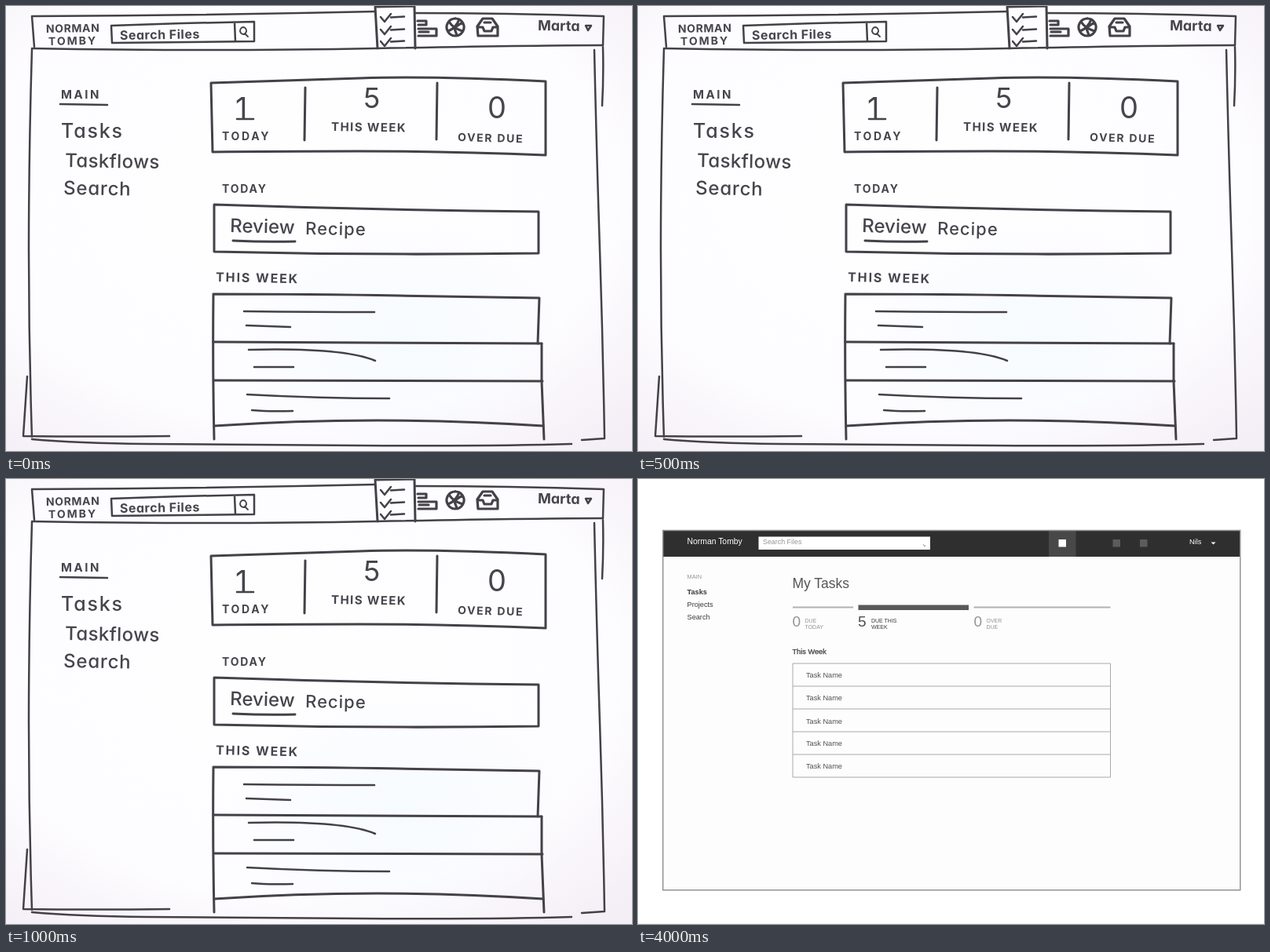
An HTML page for the animation above (5.1 s loop, 797 by 567 pixels).

```html
<!DOCTYPE html>
<html lang="en">
<head>
<meta charset="utf-8">
<title>Sketch to screen</title>
<style>
html, body { margin: 0; width: 100%; height: 100%; overflow: hidden; background: #fff; }
svg { display: block; width: 797px; height: 567px; }
.pen { fill: none; stroke: #444148; stroke-width: 2.5; stroke-linecap: round; stroke-linejoin: round; }
.box { stroke-width: 3; }
.hand { font: 700 14px Inter, sans-serif; font-feature-settings: "cv11"; fill: #47454c; }
.big { font-weight: 500; font-size: 24px; }
.num { font-weight: 400; }
.ui { font: 9.2px "Liberation Sans", Arial, sans-serif; fill: #3c3c3c; }
.ui .soft { fill: #959595; }
.ui .small { font-size: 7px; }
.ui .num { font-size: 19px; }

/* one push transition, shown as two hard steps */
.sketch { animation: sketch 5100ms step-end infinite; }
.dim { animation: dim 5100ms step-end infinite; }
.ui { animation: push 5100ms step-end infinite; }
@keyframes sketch { 0% { transform: none; } 58.8235% { transform: translateX(-225px); } 100% { transform: none; } }
@keyframes dim { 0% { opacity: 0; } 58.8235% { opacity: .23; } 100% { opacity: 0; } }
@keyframes push {
  0% { transform: translateX(800px); }
  58.8235% { transform: translateX(52px); }
  60.7843% { transform: none; }
  100% { transform: translateX(800px); }
}
</style>
</head>
<body>
<svg viewBox="0 0 797 567">
  <defs>
    <radialGradient id="paper" cx=".46" cy=".42" r=".76">
      <stop offset="0" stop-color="#fefeff"/>
      <stop offset=".68" stop-color="#fdfcfe"/>
      <stop offset="1" stop-color="#f4eef6"/>
    </radialGradient>
    <radialGradient id="cool">
      <stop offset="0" stop-color="#f6fbff"/>
      <stop offset="1" stop-color="#f6fbff" stop-opacity="0"/>
    </radialGradient>
    <path id="check" d="M477 14l5 6 8-10M490 14.500l17-1"/>
  </defs>

  <g class="sketch">
    <rect width="797" height="567" fill="url(#paper)"/>
    <ellipse cx="500" cy="425" rx="210" ry="150" fill="url(#cool)"/>

    <g class="pen">
      <!-- window -->
      <path d="M36 52L33 13Q250 12 470 7M521 9Q640 9 761 13L760 50M760 52Q761 90 759 127"/>
      <path d="M33 54Q260 58 470 54T760 50"/>
      <path d="M33 55Q29 190 29 310T33 549M27 472L22 548Q110 549 208 548"/>
      <path d="M33 552Q90 557 180 558T450 560T720 558M749 56Q752 190 756 310T762 551L733 553"/>
      <!-- search field -->
      <path d="M134 25Q220 22 316 20L316 45Q220 46 135 47ZM291 21L292 45"/>
      <path d="M302 27a4 4.500 0 1 0 .1 0M304 35l4 4" stroke-width="1.800"/>
      <!-- tab and icons -->
      <path d="M470 1L473 54M470 1L520 0L521 54" class="box"/>
      <use href="#check"/><use href="#check" y="16"/><use href="#check" y="31"/>
      <g stroke-width="3.200">
        <path d="M524 19h11v5h-10M525 29h23v9h-23M526 33h12"/>
        <path d="M572 16a11 11 0 1 0 .1 0M564 20q5 8 17 12M577 17q-4 11-14 15M572 27l9-6M571 29l3 8"/>
        <path d="M600 26l7-10h12l7 10v12h-25ZM601 27h6l2 5h9l2-5h5M609 21h8"/>
      </g>
      <path d="M738 25h7l-4 6Z"/>
      <!-- sidebar rule -->
      <path d="M69 125L129 126"/>
      <!-- counters -->
      <path class="box" d="M261 98Q360 95 450 92T687 96V190Q560 185 450 185T263 186ZM381 104L380 171M549 98L548 170"/>
      <path d="M294 144H315"/>
      <!-- today card -->
      <path class="box" d="M265 253Q470 260 678 262V315Q470 318 265 313ZM289 299Q330 301 368 300"/>
      <!-- week list -->
      <path class="box" d="M265 552Q263 460 264 367Q390 367 500 369T679 372L677 430M682 430V478L685 552"/>
      <path class="box" d="M264 428Q470 429 682 430M265 477Q470 477 683 478M265 535Q470 521 684 535"/>
      <path d="M303 389Q390 390 469 390M306 407L362 409M309 438Q430 435 470 452M316 460L366 460M307 495Q400 500 488 500M313 515Q335 517 365 516"/>
    </g>

    <g class="hand">
      <text x="51" y="34" letter-spacing=".6" transform="rotate(-1 51 34)">NORMAN</text>
      <text x="54" y="50" letter-spacing="2" transform="rotate(-1 54 50)">TOMBY</text>
      <text x="145" y="43" letter-spacing=".5" transform="rotate(-1 145 43)" style="font-size:16px">Search Files</text>
      <text x="677" y="31" transform="rotate(1 677 31)" style="font-size:18px">Marta</text>
      <text x="70" y="118" letter-spacing="2.500" style="font-size:15px">MAIN</text>
      <g class="big">
        <text x="70" y="168" letter-spacing="1.800" style="font-size:25px">Tasks</text>
        <text x="75" y="205" letter-spacing=".4" transform="rotate(1 75 205)">Taskflows</text>
        <text x="73" y="240" letter-spacing=".8" transform="rotate(1 73 240)">Search</text>
        <text x="285" y="288" transform="rotate(1.500 285 288)">Review</text>
        <text x="381" y="291" letter-spacing="1" transform="rotate(1 381 291)" style="font-size:22px">Recipe</text>
      </g>
      <g class="num">
        <text x="292" y="144" style="font-size:38px">1</text>
        <text x="455" y="130" style="font-size:36px">5</text>
        <text x="613" y="143" style="font-size:38px">0</text>
      </g>
      <text x="275" y="171" letter-spacing="2.700">TODAY</text>
      <text x="414" y="159" letter-spacing="1.400" transform="rotate(.8 414 159)" style="font-size:15px">THIS WEEK</text>
      <text x="575" y="172" letter-spacing="1.700" transform="rotate(1.500 575 172)">OVER DUE</text>
      <text x="275" y="238" letter-spacing="1.800">TODAY</text>
      <text x="267" y="351" letter-spacing="1.900" transform="rotate(1.200 267 351)" style="font-size:16px">THIS WEEK</text>
    </g>
  </g>

  <rect class="dim" width="797" height="567"/>

  <g class="ui">
    <rect x="-1" width="800" height="567" fill="#fff"/>
    <path d="M0 566.500H798" stroke="#f3f3f3"/>
    <rect x="31.750" y="65.500" width="735" height="458.250" fill="#fdfdfd"/>
    <rect x="32" y="66" width="734.500" height="33" fill="#2f2f2f"/>
    <rect x="523" y="66" width="34.500" height="33" fill="#484848"/>
    <rect x="31.750" y="65.500" width="735" height="458.250" fill="none" stroke="#949494" stroke-width="1.500"/>
    <rect x="153.500" y="73.500" width="218.500" height="16.500" fill="#fff"/>
    <path d="M363 83.500l3 2.500" stroke="#777"/>
    <rect x="535.500" y="77" width="9.500" height="9.500" fill="#fff"/>
    <path d="M604.500 77h9.500v9.500h-9.500ZM639 77h9.500v9.500h-9.500Z" fill="#5c5c5c"/>
    <path d="M729.500 80.500h6l-3 3Z" fill="#fff"/>

    <text x="62.500" y="82.500" fill="#fff" style="font-size:10.400px">Norman Tomby</text>
    <text class="soft" x="159" y="82.500" style="font-size:8.900px">Search Files</text>
    <text x="702" y="82.500" fill="#fff">Nils</text>

    <text class="soft" x="62.500" y="127" style="font-size:7.400px">MAIN</text>
    <text x="62.500" y="146.500" font-weight="700">Tasks</text>
    <text x="62.500" y="163">Projects</text>
    <text x="62.500" y="178.500">Search</text>

    <text x="196.500" y="138.500" fill="#555" style="font-size:17.500px">My Tasks</text>
    <path d="M197 163.500H274M427.500 163.500H601.500" stroke="#b2b2b2" stroke-width="1.800"/>
    <path d="M280.500 163.750H421" stroke="#59595b" stroke-width="6.500"/>
    <text class="soft num" x="196.500" y="187.500">0</text>
    <text class="num" x="280" y="187.500" fill="#505050">5</text>
    <text class="soft num" x="427.500" y="187.500">0</text>
    <text class="soft small" x="212.500" y="183">DUE<tspan x="212.500" y="191">TODAY</tspan></text>
    <text class="small" x="297" y="183">DUE THIS<tspan x="297" y="191">WEEK</tspan></text>
    <text class="soft small" x="443.500" y="183">OVER<tspan x="443.500" y="191">DUE</tspan></text>

    <text x="196.500" y="222.500" stroke="#3c3c3c" stroke-width=".25">This Week</text>
    <path d="M197 235H601.500V380H197ZM197 264H601.500M197 293H601.500M197 322H601.500M197 351H601.500" fill="none" stroke="#a9a9a9"/>
    <g fill="#505050">
      <text x="214" y="253">Task Name</text>
      <text x="214" y="282">Task Name</text>
      <text x="214" y="311.500">Task Name</text>
      <text x="214" y="340">Task Name</text>
      <text x="214" y="369">Task Name</text>
    </g>
  </g>
</svg>
</body>
</html>
```
